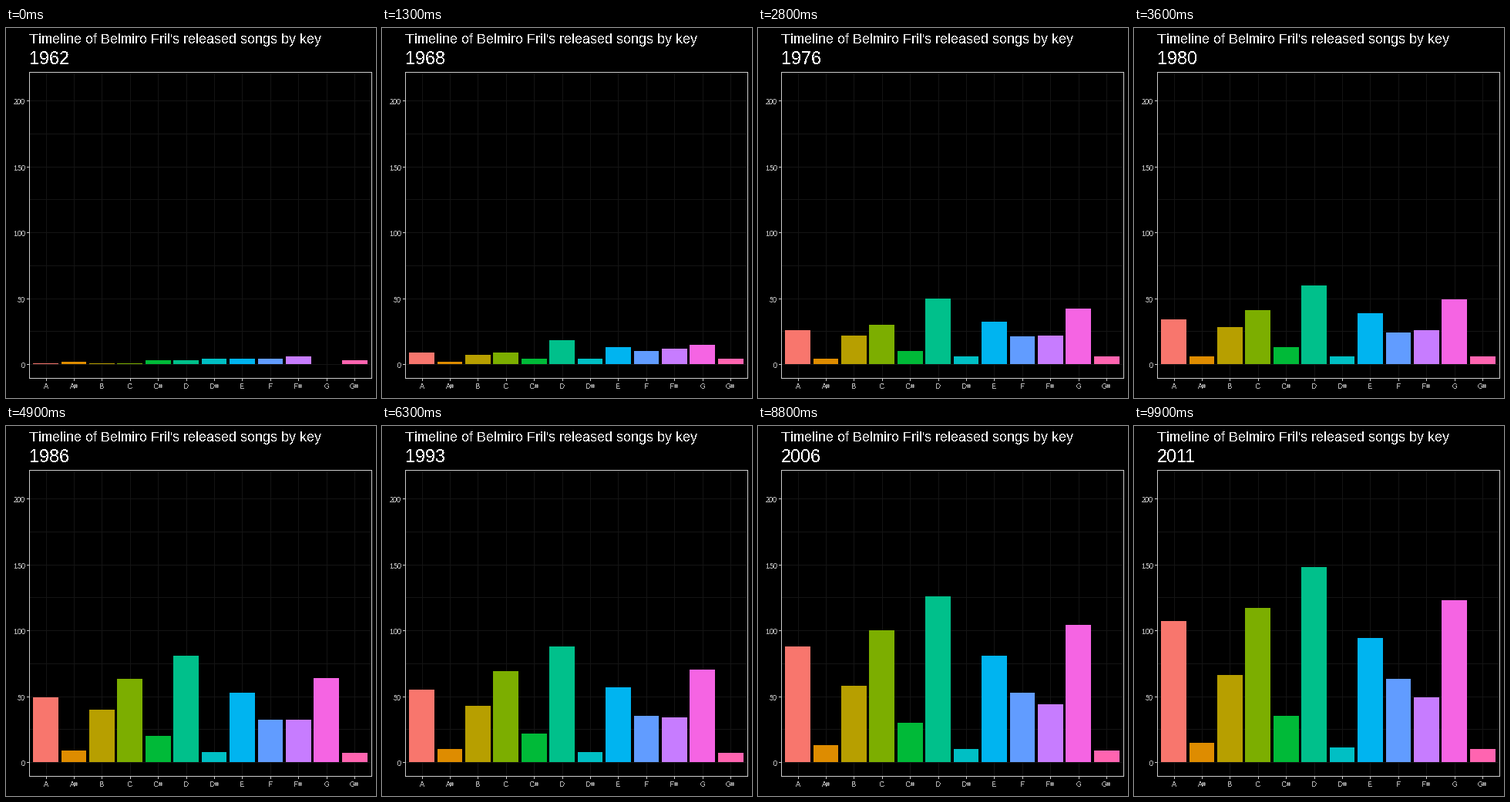
Write a matplotlib script that moves like this. It is 480 px wide and 480 px high and loops after 10000 ms.

```python
import matplotlib.pyplot as plt
import numpy as np
from matplotlib.animation import FuncAnimation
from matplotlib.patches import Rectangle

plt.rcParams.update({
    "font.family": ["Liberation Sans", "DejaVu Sans"],
    "text.antialiased": False,
    "text.hinting": "native",
    "text.hinting_factor": 1,
})

FRAMES, INTERVAL = 100, 100
FIRST_YEAR = 1962
LEFT, RIGHT, TOP, BOTTOM = 30, 474, 57, 454
FLOOR, BASE, UNIT = 436, 436.25, 1.711
GRID, LINE, LABEL = "#141414", "#cccccc", "#b3b3b3"

# Songs per key in 1966, 1972, 1986 and 2011
SONGS = {
    "A": (1, 19, 49, 107), "A#": (2, 3, 9, 15), "B": (1, 16, 40, 66),
    "C": (1, 19, 63, 117), "C#": (3, 6, 20, 35), "D": (3, 39, 81, 148),
    "D#": (4, 5, 8, 11), "E": (4, 25, 53, 94), "F": (4, 17, 32, 63),
    "F#": (6, 19, 32, 49), "G": (0, 34, 64, 123), "G#": (3, 5, 7, 10),
}
KNOTS = [4, 11, 25, 50]

# Bars advance once per year, except in years without releases
STEPS = np.arange(51)
QUIET = [*range(5), 18, *range(24, 31, 2), 31, 33, 34, 37, 45, 49]
RELEASES = np.cumsum(~np.isin(STEPS, QUIET))


def growth():
    """Even growth per release year, easing in after the third knot."""
    start, end = RELEASES[KNOTS[2]], RELEASES[-1]
    late = np.clip((RELEASES - start) / (end - start), 0, 1)
    return np.minimum(RELEASES, start) + (end - start) * late ** 1.35


def hue_color(degrees, chroma=100, light=65):
    """Polar CIE LUV to sRGB."""
    h = np.radians(degrees)
    u = chroma * np.cos(h) / (13 * light) + 0.19784
    v = chroma * np.sin(h) / (13 * light) + 0.46834
    y = ((light + 16) / 116) ** 3
    x = 9 * y * u / (4 * v)
    z = -x / 3 - 5 * y + 3 * y / v
    rgb = np.array([
        3.240479 * x - 1.537150 * y - 0.498535 * z,
        -0.969256 * x + 1.875992 * y + 0.041556 * z,
        0.055648 * x - 0.204043 * y + 1.057311 * z,
    ]).clip(0, 1)
    return np.where(rgb > 0.00304, 1.055 * rgb ** (1 / 2.4) - 0.055,
                    12.92 * rgb).clip(0, 1)


def y_px(value):
    return round(BASE - UNIT * value)


def box(x, y, w, h, color, z):
    return ax.add_patch(Rectangle((x, y), w, h, fc=color, lw=0, zorder=z,
                                  antialiased=False))


def label(x, y, text, size, color="white", ha="left"):
    return ax.text(x, y, text, fontsize=size, color=color, ha=ha, va="baseline")


fig = plt.figure(figsize=(480 / 72, 480 / 72), dpi=72, facecolor="black")
ax = fig.add_axes([0, 0, 1, 1])
ax.set_xlim(0, 480)
ax.set_ylim(480, 0)
ax.axis("off")

label(30, 20, "Timeline of Belmiro Fril's released songs by key", 18)
year = label(30, 47, "", 24)

width, height = RIGHT - LEFT + 1, BOTTOM - TOP + 1
for x in (LEFT, RIGHT):
    box(x, TOP, 1, height, LINE, 3)
for y in (TOP, BOTTOM):
    box(LEFT, y, width, 1, LINE, 3)

for value in range(0, 201, 25):
    y = y_px(value)
    box(LEFT, y, width, 1, GRID, 1)
    if value % 50 == 0:
        box(LEFT - 3, y, 3, 1, LINE, 3)
        label(25, y + 5, str(value), 9, LABEL, "right")

grown = growth()
bars = []
for i, (key, songs) in enumerate(SONGS.items()):
    x = int(52 + 36.4 * i)
    box(x, TOP, 1, height, GRID, 1)
    box(x, BOTTOM + 1, 1, 3, LINE, 3)
    label(x, 468, key, 9, LABEL, "center")

    mid = 51.5 + 36.43 * i
    x0, x1 = round(mid - 16.4), round(mid + 16.4)
    bar = box(x0, FLOOR, x1 - x0, 0, hue_color(15 + 30 * i), 2)
    counts = np.rint(np.interp(grown, grown[KNOTS], songs))
    bars.append((bar, counts))


def update(frame):
    year.set_text(str(FIRST_YEAR + frame // 2))
    step = (frame + 1) // 2
    for bar, counts in bars:
        top = y_px(counts[step])
        bar.set_y(top)
        bar.set_height(FLOOR - top)
    return [year, *(bar for bar, _ in bars)]


anim = FuncAnimation(fig, update, frames=FRAMES, interval=INTERVAL,
                     repeat=True, repeat_delay=0, blit=False)
plt.show()
```
